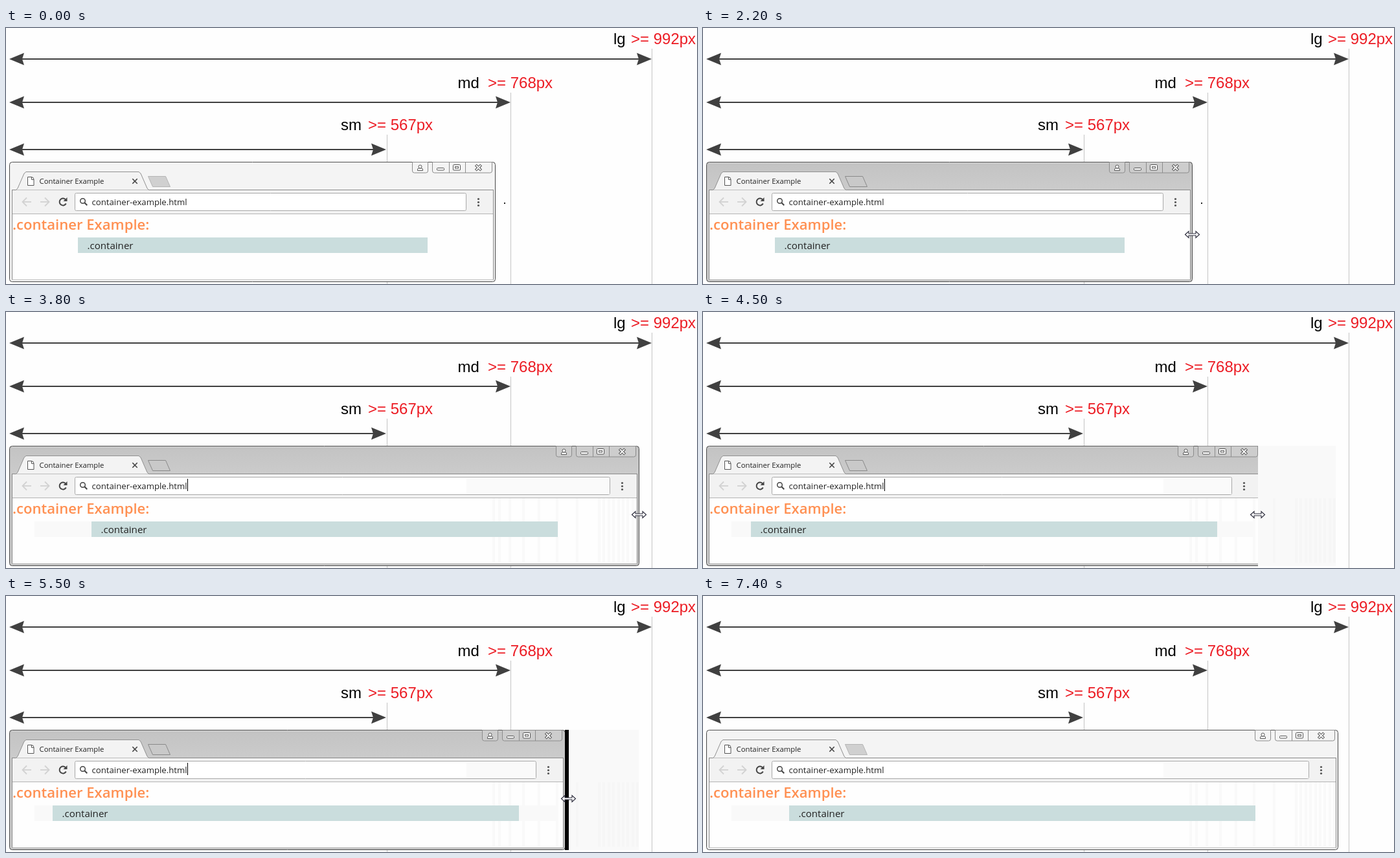
An HTML page with a canvas for the animation above (7.6 s loop, 1067 by 396 pixels).

```html
<!DOCTYPE html>
<html lang="en">
<head>
<meta charset="utf-8">
<title>Container Example</title>
<style>
html, body { margin: 0; width: 100%; height: 100%; overflow: hidden; background: #fefefe; }
canvas { display: block; }
</style>
</head>
<body>
<canvas id="stage" width="1067" height="396"></canvas>
<script>
const ctx = document.getElementById('stage').getContext('2d');
const LOOP = 7600, STEP = 100;
const TOP = 207, HEIGHT = 186;
const DRAG_START = 2200, WIDEST = 3800;
const UI = '"Open Sans", "Noto Sans", sans-serif';
const LABEL = '24px "Liberation Sans", Arial, sans-serif';

const linear = p => p;
const accelerate = p => p ** 1.5;
const brake = p => 1 - (1 - p) ** 2;
const smooth = p => p * p * (3 - 2 * p);

// eased progress from 0 to 1 between two times
const ramp = (t, from, to, ease = linear) =>
  ease(Math.min(1, Math.max(0, (t - from) / (to - from))));

// start, end, distance and easing of each drag of the window edge
const DRAGS = [
  [DRAG_START, 2900, 163, accelerate],
  [2900, 3700, 59, linear],
  [3900, 4835, -171, smooth],
  [5025, 6200, 174, smooth]
];
const edgeAt = t => Math.round(
  DRAGS.reduce((x, [from, to, dist, ease]) => x + dist * ramp(t, from, to, ease), 755));

function rect(x, y, w, h, color) {
  ctx.fillStyle = color;
  ctx.fillRect(x, y, w, h);
}
function text(s, x, y, font, color) {
  ctx.font = font;
  ctx.fillStyle = color;
  ctx.fillText(s, x, y);
}
function paint(fill, stroke, width = 1) {
  if (fill) { ctx.fillStyle = fill; ctx.fill(); }
  if (stroke) { ctx.strokeStyle = stroke; ctx.lineWidth = width; ctx.stroke(); }
}
function poly(points, fill, stroke, width, open) {
  ctx.beginPath();
  points.forEach(([x, y]) => ctx.lineTo(x, y));
  if (!open) ctx.closePath();
  paint(fill, stroke, width);
}
const line = (points, color, width = 1) => poly(points, null, color, width, true);
function round(x, y, w, h, r, fill, stroke) {
  ctx.beginPath();
  ctx.roundRect(x, y, w, h, r);
  paint(fill, stroke);
}
function arc(x, y, r, fill, stroke, width, from = 0, to = Math.PI * 2) {
  ctx.beginPath();
  ctx.arc(x, y, r, from, to);
  paint(fill, stroke, width);
}
function cross(x, y, r, color, width) {
  line([[x - r, y - r], [x + r, y + r]], color, width);
  line([[x + r, y - r], [x - r, y + r]], color, width);
}
function clipped(x, y, w, h, drawInside) {
  ctx.save();
  ctx.beginPath();
  ctx.rect(x, y, w, h);
  ctx.clip();
  drawInside();
  ctx.restore();
}

function arrowHead(x, y, dir) {
  poly([[x, y], [x + 23 * dir, y - 9.5], [x + 20 * dir, y], [x + 23 * dir, y + 9.5]], '#404040');
}

function breakpoint(name, size, nameX, sizeX, base, y, tip, lineX) {
  text(name, nameX, base, LABEL, '#000');
  text('>= ' + size, sizeX, base, LABEL, '#ec1c24');
  rect(lineX, base + 7, 1, 396, '#c4c4c4');
  line([[20, y], [tip - 15, y]], '#404040', 2.2);
  arrowHead(5, y, 1);
  arrowHead(tip, y, -1);
}

function backdrop() {
  rect(0, 0, 1067, 396, '#fefefe');
  breakpoint('lg', '992px', 938, 965, 25, 48, 997, 997);
  breakpoint('md', '768px', 697.5, 744, 93, 115, 779, 779);
  breakpoint('sm', '567px', 517, 559, 158, 188, 587, 588);
  rect(769, 270, 2, 2, '#222');
}

function captionButtons(r, fill, edge) {
  const ink = '#555';
  round(r - 127.5, 207.5, 24, 16.5, [0, 0, 3, 3], fill, edge);
  round(r - 96.5, 207.5, 92, 16.5, [0, 0, 3, 3], fill, edge);
  for (const x of [r - 70.5, r - 45.5]) line([[x, 208], [x, 224]], edge);
  // profile, minimise, maximise, close
  round(r - 119.5, 217, 8, 3.5, [2, 2, 0, 0], '#fff', ink);
  arc(r - 115.5, 214.5, 2.5, '#fff', ink);
  round(r - 89.5, 216.5, 11, 3.5, 1, '#fff', ink);
  round(r - 64.5, 211.5, 11, 8.5, 1, '#fff', ink);
  ctx.strokeRect(r - 61.5, 214.5, 5, 2.5);
  cross(r - 25.5, 216, 4.2, ink, 4);
  cross(r - 25.5, 216, 3.6, '#fff', 2);
}

function tabStrip(active) {
  const side = [[-102.5, 250.5], [-100, 248], [-90, 225], [-87, 222.5]];
  const mirrored = side.map(([x, y]) => [-x, y]).reverse();
  poly(side.concat(mirrored).map(([x, y]) => [x + 118, y]), '#f3f3f3', '#909090', 1, true);
  poly([[219.5, 229.5], [246.5, 229.5], [253.5, 245.5], [226.5, 245.5]],
    active ? '#c9c9c9' : '#d0d0d0', active ? '#8a8a8a' : '#b5b5b5');
  round(33.5, 230.5, 9.5, 13, [0, 4, 0, 0], '#fff', '#555');
  line([[39.5, 230.5], [39.5, 234.5], [43, 234.5]], '#555');
  text('Container Example', 51.5, 241, '11.3px ' + UI, '#222');
  cross(199, 237, 3.7, '#444', 1.6);
}

function navArrow(x, dir) {
  line([[x - 7 * dir, 269], [x + 6 * dir, 269]], '#d2d2d2', 1.8);
  line([[x, 262.5], [x + 6.5 * dir, 269], [x, 275.5]], '#d2d2d2', 1.8);
}

function toolbar(r, s) {
  rect(10, 251, r - 13, 36, '#f2f2f2');
  rect(10, 287, r - 13, 1, '#b4b4b4');
  navArrow(32, -1);
  navArrow(60, 1);
  arc(88, 269, 5.4, null, '#454545', 2, 0.5, 5.5);
  poly([[94.5, 262], [94.5, 268], [88.5, 268]], '#454545');

  round(106.5, 255.5, r - 151, 27, 2, '#fff', '#a9a9a9');
  if (s.dragged) rect(711, 257, r - 756, 25, '#fafafa');
  arc(118.5, 267.5, 3.8, null, '#444', 1.5);
  line([[121.3, 270.3], [125.3, 274.3]], '#444', 2);
  text('container-example.html', 132.5, 274, '13.2px ' + UI, '#222');
  if (s.caret) rect(280, 258, 1, 19, '#000');
  for (let i = 0; i < 3; i++) arc(r - 25.5, 264.5 + 5 * i, 1.6, '#555');
}

const barLeft = (r, width) => Math.ceil((r + 6) / 2) - width / 2;

function page(r, s) {
  rect(10, 288, r, 101, '#fefefe');
  if (s.dragged) {
    edgeMarks(s.t, '#f9f9f9');
    rect(44, 324, barLeft(s.widest, 720) + 676, 24, '#f9f9f9');
  }
  text('.container Example:', 10, 312, '600 22.1px ' + UI, '#ff9052');
  const width = r < 790 ? 540 : 720;
  const left = barLeft(r, width);
  rect(left, 324, width, 24, '#cadddd');
  text('.container', left + 14.5, 342, '15.1px ' + UI, '#222');
}

// faint marks where the window edge has been
function edgeMarks(t, color, minX = 0) {
  for (let k = DRAG_START; k < Math.min(t, WIDEST); k += STEP) {
    const x = edgeAt(k) - 4;
    if (x > minX) rect(x, 288, 4, 100, color);
  }
}

function browser(r, pageR, s) {
  let fill = '#f4f4f4';
  if (s.active) {
    fill = ctx.createLinearGradient(0, TOP, 0, 251);
    fill.addColorStop(0, '#c3c3c3');
    fill.addColorStop(1, '#cbcbcb');
  }
  round(5.5, 207.5, r - 5, 185, 4, fill, '#484848');
  line([[9, 208.5], [r - 3, 208.5]], s.active ? '#dadada' : '#fff');
  ctx.strokeStyle = '#8a8a8a';
  ctx.strokeRect(9.5, 250.5, r - 12, 138.5);
  tabStrip(s.active);
  captionButtons(r, s.active ? '#cdcdcd' : '#f4f4f4', '#8c8c8c');
  toolbar(r, s);
  clipped(10, 288, r - 13, 101, () => page(pageR, s));
}

function pointer(x, y) {
  poly([[0, 0], [0, 16], [3.8, 12.5], [6.5, 18.5], [9, 17.5], [6.4, 11.5], [11.5, 11.5]]
    .map(([a, b]) => [x + a + 0.5, y + b + 0.5]), '#fff', '#222');
}

function grip(x, y) {
  const half = [[-11, 0], [-5.5, -5], [-5.5, -1.5], [5.5, -1.5], [5.5, -5]];
  const points = half.concat(half.map(([a, b]) => [-a, -b]));
  poly(points.map(([a, b]) => [x + a + 0.5, y + b + 0.5]), '#fff', '#2a2a3a', 1.1);
}

function cursor(t, r) {
  if (t < 100 || t >= 6800) return;
  if (t < 800) {
    const p = ramp(t, 100, 500, brake);
    pointer(1043 - 302 * p, 87 + 234 * p);
  } else if (t < 6600) {
    const settle = ramp(t, 1000, 1600, smooth);
    grip(r + 2 - 2 * settle, 329 - 10 * settle - 6 * ramp(t, DRAG_START, 3500));
  } else {
    pointer(988 + 11 * ramp(t, 6600, 6700), 303);
  }
}

function draw(t) {
  const r = edgeAt(t);
  const widest = Math.max(r, edgeAt(Math.min(t, WIDEST)));
  // the frame is repainted a little later than the edge moves
  const shrinking = t >= 4200 && t <= 4800;
  const growing = t >= 5200 && t <= 6000;
  const frameR = r + (shrinking ? 5 : growing ? -5 : 0);
  const pageR = frameR - (growing ? 5 : 0);
  const s = {
    t, widest,
    active: t >= 1800 && t < 7400,
    caret: (t > DRAG_START && t < 6600) || (t >= 7100 && t < 7400),
    dragged: t >= 2500
  };

  backdrop();
  rect(r, TOP, widest - r, HEIGHT, '#f9f9f9');
  edgeMarks(t, '#f6f6f6', r);
  clipped(0, 0, r + 1, 396, () => {
    browser(frameR, pageR, s);
    if (growing) rect(frameR, TOP, r - frameR + 1, HEIGHT, '#000');
  });
  cursor(t, r);
}

const start = performance.now();
function tick() {
  const t = (performance.now() - start) % LOOP;
  draw(Math.floor(t / STEP) * STEP);
  requestAnimationFrame(tick);
}
tick();
</script>
</body>
</html>
```
